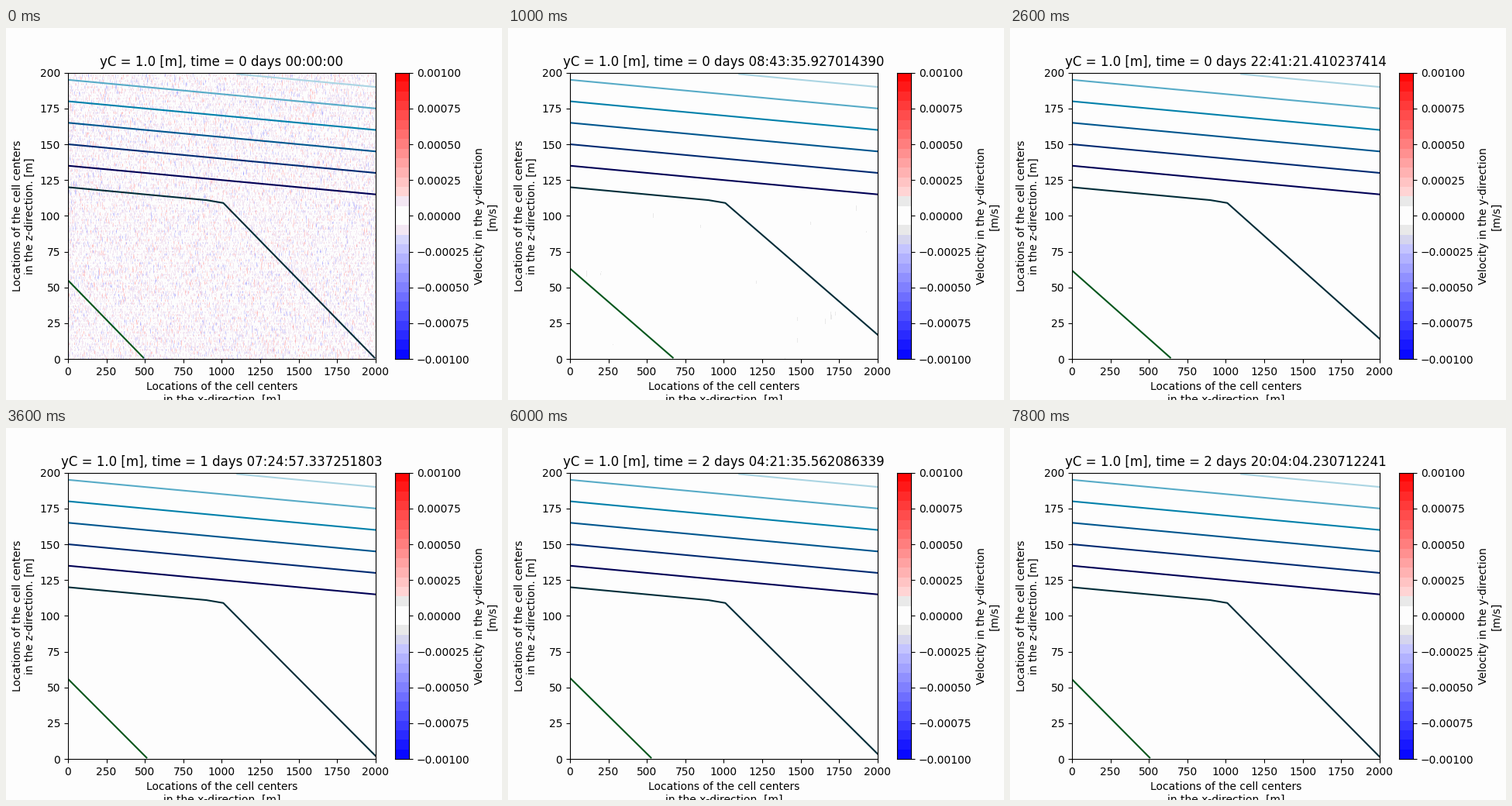
Animation, 640 px wide and 480 px high, one loop 8000 ms. Source, as a matplotlib script:

```python
import numpy as np
import matplotlib.pyplot as plt
from matplotlib.animation import FuncAnimation

FRAMES, INTERVAL = 40, 200
STEP_NS = 6283185402877.97        # model time per frame
TURN = np.radians(37.78)          # inertial oscillation per frame
PAPER = "#fdfdfd"
BANDS = 30
LEVELS = 8
ROWS, COLS = 100, 397

plt.rcParams["font.family"] = "DejaVu Sans"
rng = np.random.default_rng(7)
grain = rng.standard_normal((ROWS, COLS))


def rgb(code):
    return [int(code[i:i + 2], 16) for i in (1, 3, 5)]


def band_colors(mid, cool):
    mids = (np.arange(BANDS) + 0.5) / BANDS
    table = (plt.get_cmap("bwr")(mids)[:, :3] * 255).round()
    half = BANDS // 2
    table[half - 1:half + 1] = rgb(PAPER)
    table[[half - 2, half + 1]] = rgb(mid)
    table[half - 3] = rgb(cool)
    return table.astype(np.uint8)


START = band_colors("#f3e7f3", "#d6d6fc")
LATER = band_colors("#e9e9e9", "#d5d5ee")


def palette(k):
    return START if k == 0 else LATER


def velocity(k):
    """Random initial noise, damped and smeared vertically (in 1e-3 m/s)."""
    field = grain
    if k:
        row = np.arange(ROWS)
        spread = 0.5 * np.sqrt(k)
        w = np.exp(-(row[:, None] - row) ** 2 / (2 * spread ** 2))
        w /= np.sqrt((w ** 2).sum(axis=1, keepdims=True))
        field = w @ grain
        field = field * np.where(row < 55, 1, 0.75)[:, None]
    pos = np.linspace(0, ROWS - 1, 370)
    low = np.minimum(pos.astype(int), ROWS - 2)
    part = (pos - low)[:, None]
    field = field[low] * (1 - part) + field[low + 1] * part
    return 0.1 * np.exp(-0.31 * k) * field


def velocity_image(k):
    index = np.floor((velocity(k) + 1) / 2 * BANDS).astype(int)
    return palette(k)[np.clip(index, 0, BANDS - 1)]


def clock(k):
    sec, ns = divmod(round(k * STEP_NS), 10 ** 9)
    days, sec = divmod(sec, 86400)
    text = f"{days} days {sec // 3600:02d}:{sec // 60 % 60:02d}:{sec % 60:02d}"
    return text + (f".{ns:09d}" if ns else "")


fig = plt.figure(figsize=(6.4, 4.8), dpi=100, facecolor=PAPER)
ax = fig.add_axes([0.125, 0.11, 0.62, 0.77], facecolor=PAPER)
noise = ax.imshow(velocity_image(0), extent=(0, 2000, 0, 200), origin="lower",
                  aspect="auto", interpolation="nearest", zorder=0)

ocean = plt.get_cmap("ocean")
isotherms = [ax.plot([], [], color=ocean((i + 1) / (LEVELS + 1)), lw=1.5)[0]
             for i in range(LEVELS)]
for i, line in enumerate(isotherms[2:]):
    top = 135 + 15 * i
    first = max(0, (top - 199) * 100)
    line.set_data([first, 2000], [top - 0.01 * first, top - 20])

ax.set(xlim=(0, 2000), ylim=(0, 200),
       xticks=range(0, 2001, 250), yticks=range(0, 201, 25),
       xlabel="Locations of the cell centers\nin the x-direction. [m]",
       ylabel="Locations of the cell centers\nin the z-direction. [m]")
title = ax.set_title("")

cax = fig.add_axes([0.78375, 0.11, 18.48 / 640, 0.77])
scale = cax.imshow(START[:, None], extent=(0, 1, -0.001, 0.001),
                   origin="lower", aspect="auto", interpolation="nearest")
cax.yaxis.tick_right()
cax.yaxis.set_label_position("right")
cax.set(xticks=[], yticks=np.arange(-4, 5) * 0.00025, ylim=(-0.001, 0.001))
cax.yaxis.set_major_formatter(lambda v, _: f"{v:.5f}".replace("-", "\u2212"))
cax.set_ylabel("Velocity in the y-direction\n[m/s]")


def draw(k):
    swing = -np.cos(k * TURN)
    isotherms[0].set_data([0, 580 + 90 * swing], [59.15 + 4.15 * swing, 1])

    end_x, end_z = 2000, 8.7 + 8.45 * swing
    if end_z < 1:
        end_x = 1010 + 990 * 108 / (109 - end_z)
        end_z = 1
    isotherms[1].set_data([0, 900, 1010, end_x], [120, 111, 109, end_z])

    noise.set_data(velocity_image(k))
    scale.set_data(palette(k)[:, None])
    title.set_text(f"yC = 1.0 [m], time = {clock(k)}")
    return [noise, scale, title, *isotherms]


anim = FuncAnimation(fig, draw, frames=FRAMES, interval=INTERVAL,
                     repeat=True, repeat_delay=0, blit=False)
plt.show()
```
